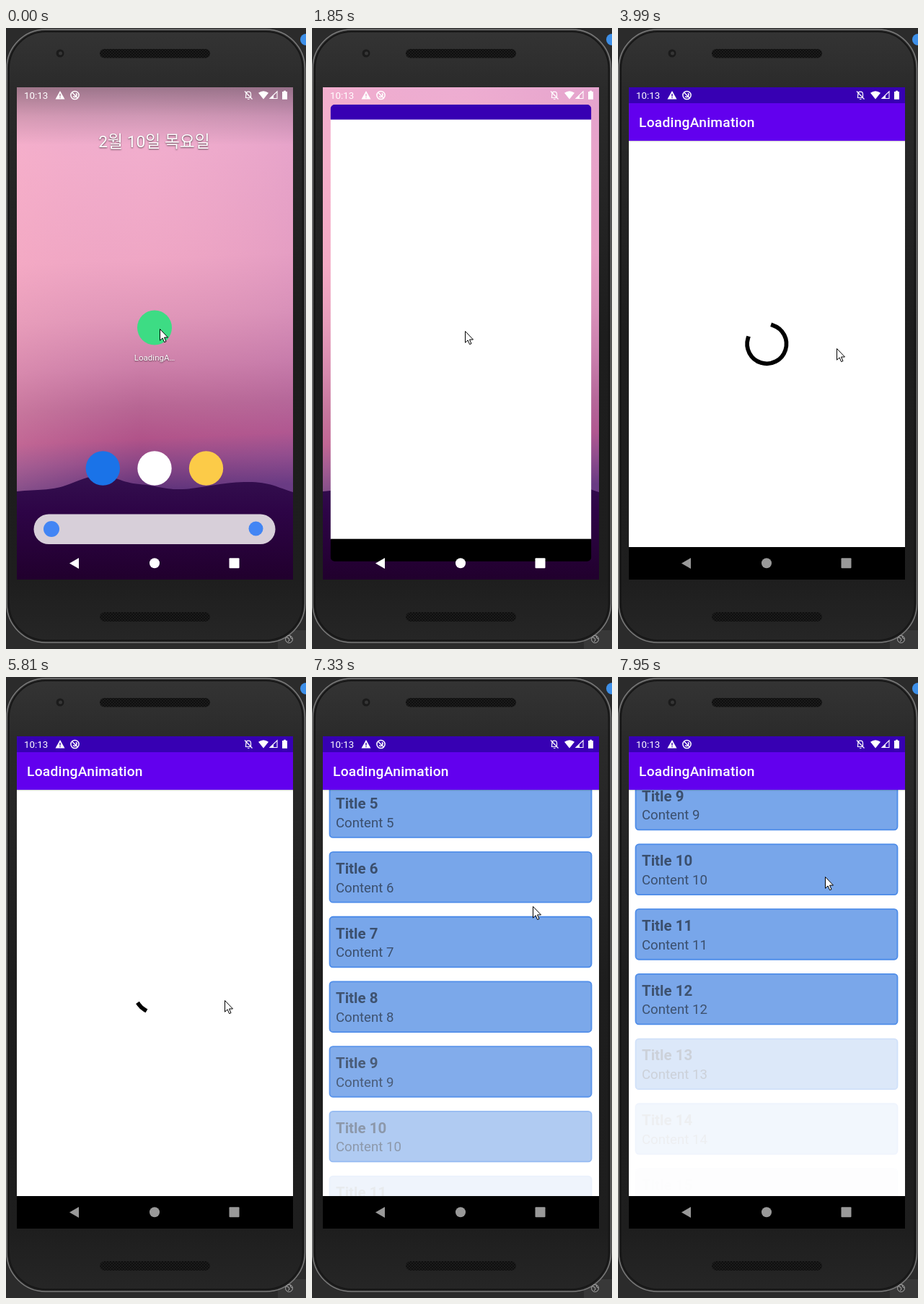
Write an HTML page that moves like this. It is 416 px wide and 859 px high and loops after 8000 ms.

```html
<!DOCTYPE html>
<html lang="ko">
<head>
<meta charset="utf-8">
<title>Loading animation</title>
<style>
  html, body { margin: 0; width: 100%; height: 100%; overflow: hidden; background: #2b2b2b; }
  svg { display: block; width: 100%; height: 100%; }
  text { font-family: Roboto, "Noto Sans CJK KR", "Noto Sans CJK", sans-serif; }
  .home text { fill: #fff; text-anchor: middle; text-shadow: 0 1px 2px #0009; }
  .bar-title { font-size: 19.2px; font-weight: 500; letter-spacing: .0125em; fill: #fff; }
  .card rect { fill: #78a6ea; stroke: #4d8ce9; stroke-width: 1.8; }
  .card text { fill: #3b4f6d; font-size: 18.64px; }
  .card .head { font-size: 20.5px; font-weight: 700; }
</style>
</head>
<body>
<svg viewBox="0 0 416 859">
  <defs>
    <linearGradient id="body" x2="0" y2="1">
      <stop stop-color="#343434"/><stop offset=".1" stop-color="#2a2a2a"/>
      <stop offset=".5" stop-color="#1d1d1d"/><stop offset=".9" stop-color="#1e1e1e"/>
      <stop offset="1" stop-color="#262626"/>
    </linearGradient>
    <linearGradient id="sky" x1="0" y1="0" x2=".025" y2="1">
      <stop stop-color="#eeaed3"/><stop offset=".15" stop-color="#f2aecd"/>
      <stop offset=".36" stop-color="#f0a7c5"/><stop offset=".48" stop-color="#e096b8"/>
      <stop offset=".58" stop-color="#cb7da7"/><stop offset=".66" stop-color="#b56391"/>
      <stop offset=".725" stop-color="#ae4f86"/><stop offset=".77" stop-color="#894383"/>
      <stop offset=".83" stop-color="#562c76"/>
    </linearGradient>
    <linearGradient id="dusk">
      <stop stop-color="#ffb0c0" stop-opacity=".25"/><stop offset=".45" stop-color="#e09ac0" stop-opacity=".05"/>
      <stop offset="1" stop-color="#b878bc" stop-opacity=".2"/>
    </linearGradient>
    <linearGradient id="hills" x2="0" y2="1">
      <stop stop-color="#34104f"/><stop offset=".35" stop-color="#2d0446"/><stop offset="1" stop-color="#21002d"/>
    </linearGradient>
    <linearGradient id="shade" x2="0" y2="1">
      <stop stop-color="#222" stop-opacity=".4"/><stop offset=".5" stop-color="#222" stop-opacity=".15"/>
      <stop offset="1" stop-color="#222" stop-opacity="0"/>
    </linearGradient>
    <linearGradient id="drop" x2="0" y2="1">
      <stop stop-color="#000" stop-opacity=".2"/><stop offset="1" stop-color="#000" stop-opacity="0"/>
    </linearGradient>
    <pattern id="mesh" width="4" height="4" patternUnits="userSpaceOnUse">
      <rect width="4" height="4" fill="#1b1b1b"/><circle cx="1" cy="1" r=".9" fill="#090909"/><circle cx="3" cy="3" r=".9" fill="#090909"/>
    </pattern>
    <clipPath id="screenClip"><rect x="15" y="82" width="383" height="681"/></clipPath>
    <clipPath id="listClip"><rect x="15" y="156" width="383" height="562"/></clipPath>
    <clipPath id="windowClip"><rect id="windowRect"/></clipPath>
  </defs>

  <!-- device -->
  <rect width="416" height="859" fill="#2b2b2b"/>
  <rect x="377" y="833" width="39" height="26" fill="#383838"/>
  <circle cx="416" cy="16" r="8" fill="#3d8fe8"/>
  <rect x="1" y="2" width="413.5" height="848" rx="54" fill="url(#body)" stroke="#7a7a7a" stroke-width="1.5"/>
  <rect x="4" y="5" width="407.5" height="842" rx="51" fill="none" stroke="#171717" stroke-width="2"/>
  <circle cx="75" cy="35" r="5.5" fill="#1b1b1b"/><circle cx="75.5" cy="35" r="2.5" fill="#363636"/>
  <rect x="130" y="29" width="153" height="12.5" rx="6.2" fill="url(#mesh)"/>
  <rect x="130" y="808" width="153" height="13" rx="6.5" fill="url(#mesh)"/>
  <g fill="none" stroke="#a9a9a9"><circle cx="392.5" cy="845.5" r="5"/><path d="M389 843l3 1 1 3-2 2M394 841l1 3 2 1"/></g>

  <g clip-path="url(#screenClip)">
    <rect x="15" y="82" width="383" height="681" fill="url(#sky)"/>
    <rect x="15" y="82" width="383" height="681" fill="url(#dusk)"/>
    <path d="M15 641C45 638 62 640 82 633S112 620 130 619S160 629 185 631S220 639 245 638S295 629 330 628S375 635 398 642V763H15Z" fill="url(#hills)"/>

    <g id="home" class="home">
      <rect x="15" y="82" width="383" height="80" fill="url(#shade)"/>
      <text x="205.5" y="165" font-size="22.8">2월 10일 목요일</text>
      <circle cx="206" cy="414.5" r="24" fill="#3ddc84"/>
      <text x="206" y="460" font-size="11.5">LoadingA…</text>
      <circle cx="134.3" cy="609" r="23.7" fill="#1a73e8"/>
      <circle cx="206" cy="609" r="23.7" fill="#fff"/>
      <circle cx="277.5" cy="609" r="23.7" fill="#fccb48"/>
      <rect x="38.5" y="672.5" width="335" height="41.5" rx="20.7" fill="#d7cfd9"/>
      <circle cx="63" cy="693" r="11" fill="#4285f4"/>
      <circle cx="346.5" cy="692.5" r="10" fill="#4285f4"/>
    </g>

    <g clip-path="url(#windowClip)">
      <g id="app">
        <rect x="15" y="103" width="383" height="616" fill="#fff"/>
        <rect x="15" y="82" width="383" height="22" fill="#3700b3"/>
        <rect x="15" y="718" width="383" height="45"/>
        <g id="content">
          <g id="list" clip-path="url(#listClip)"></g>
          <rect x="15" y="156" width="383" height="2" fill="url(#drop)"/>
          <rect x="15" y="104" width="383" height="52" fill="#6200ee"/>
          <text class="bar-title" x="29" y="137">LoadingAnimation</text>
          <path id="spinner" fill="none" stroke="#000" stroke-width="5.7" stroke-linecap="square"/>
        </g>
      </g>
    </g>

    <!-- system bars -->
    <g fill="#fff">
      <text x="25" y="98" font-size="13.3">10:13</text>
      <path fill-rule="evenodd" d="M75 87L81.5 98.5H68.5ZM74.3 91V94.7H75.7V91ZM74.3 95.7V97H75.7V95.7Z"/>
      <g fill="none" stroke="#fff">
        <circle cx="95.5" cy="93" r="5.6" stroke-width="1.5"/>
        <path d="M92 89.5L99 96.5M93 94.5A2.8 2.8 0 1 0 97 90.3" stroke-width="1.5"/>
        <path d="M332.5 96.5H339.5V91.5A3.3 3.3 0 0 0 332.8 91.5ZM331 87.5L341.5 98.5M335 98.5H337.5" stroke-width="1.2"/>
        <path d="M366 97.5H376V87.8Z" stroke-width="1.1"/>
      </g>
      <path d="M350 89.8Q357 84.5 364 89.8L357 98.5Z"/>
      <path d="M371 93V97.5H366.5Z"/>
      <path d="M383 88H385V86.7H388V88H390V98.7H383Z"/>
    </g>
    <g id="nav">
      <path d="M101 733V748L88 740.5Z"/><circle cx="206" cy="740.3" r="7"/><rect x="309.5" y="733.3" width="14" height="14" rx="1"/>
    </g>
    <circle id="touch" cx="212" cy="419" r="12" fill="#fff" opacity=".4"/>
  </g>
  <path id="cursor" d="M.5 .5V16.2L4.1 12.9L6.6 18.6L9 17.6L6.5 12H11.5Z" fill="#fff" stroke="#000" stroke-width="1"/>
</svg>

<script>
const LOOP = 8000, PITCH = 89.7, FIRST_TOP = 165.7, FADE = 500;
const LIST_AT = 5880, OPEN_AT = 1450, SPIN_AT = 1855;
const $ = id => document.getElementById(id);
const clamp = x => Math.max(0, Math.min(1, x));
const mix = (a, b, f) => a + (b - a) * f;
const ramp = (t, from, to) => clamp((t - from) / (to - from));
const easeOut = x => 1 - (1 - x) ** 3;
const show = (el, on) => el.setAttribute('display', on ? 'inline' : 'none');

// Piecewise linear lookup in [x, y] pairs.
function track(keys, x) {
  const i = keys.findIndex(k => k[0] > x);
  if (i < 0) return keys[keys.length - 1][1];
  if (i === 0) return keys[0][1];
  const [a, b] = [keys[i - 1], keys[i]];
  return mix(a[1], b[1], (x - a[0]) / (b[0] - a[0]));
}

const scrollKeys = [[6840, 0], [6915, 165], [7050, 255], [7218, 344.7], [7326, 373.3], [7500, 436],
  [7600, 455], [7690, 464], [7780, 524], [7855, 614], [7949, 742.7]];
const scrollTimes = scrollKeys.map(([t, y]) => [y, t]);
const cursorX = [[320, 213], [390, 212], [2330, 212], [2900, 303], [6840, 303], [6980, 309],
  [7326, 306], [7680, 298], [7949, 287]];
const cursorY = [[320, 416], [390, 419], [2330, 419], [2900, 443], [4000, 443], [5740, 447], [6490, 447],
  [6640, 456.5], [6840, 456.5], [6980, 300], [7326, 317], [7680, 425], [7949, 276]];

// Cubic easing from (0,0) to (1,1) with control points (x1,0) and (x2,1).
function ease(x1, x2, x) {
  let lo = 0, hi = 1;
  for (let i = 0; i < 20; i++) {
    const u = (lo + hi) / 2, v = 1 - u;
    if (3 * v * v * u * x1 + 3 * v * u * u * x2 + u * u * u < x) lo = u; else hi = u;
  }
  return lo * lo * (3 - 2 * lo);
}

function arc(start, sweep) {
  const point = deg => {
    const a = deg * Math.PI / 180;
    return `${206.3 + 27.2 * Math.sin(a)} ${437 - 27.2 * Math.cos(a)}`;
  };
  return `M${point(start)}A27.2 27.2 0 ${sweep > 180 ? 1 : 0} 1 ${point(start + sweep)}`;
}

const cards = Array.from({ length: 15 }, (_, i) => {
  const el = document.createElementNS('http://www.w3.org/2000/svg', 'g');
  el.setAttribute('class', 'card');
  el.innerHTML = `<rect x="24.5" y=".9" width="363" height="69.6" rx="4.5"/>
    <text class="head" x="33" y="30.8">Title ${i + 1}</text><text x="33" y="56.5">Content ${i + 1}</text>`;
  $('list').append(el);
  const top = FIRST_TOP + PITCH * i;
  return { el, top, born: top < 718 ? LIST_AT : track(scrollTimes, top - 718) };
});

// The window grows a little faster in width than in height.
function drawWindow(t) {
  const across = easeOut(ramp(t, OPEN_AT, OPEN_AT + 615));
  const down = easeOut(ramp(t, OPEN_AT, OPEN_AT + 645));
  const x = mix(182, 15, across), width = mix(48, 383, across);
  const y = mix(390, 82, down), height = mix(438, 763, down) - y;
  const rect = { x, y, width, height, rx: down < 1 ? mix(24, 4.5, down) : 0 };
  for (const key in rect) $('windowRect').setAttribute(key, rect[key]);
  const s = width / 383;
  $('app').setAttribute('transform', `translate(${x - 15 * s} ${y - 82 * s}) scale(${s})`);
  $('app').setAttribute('opacity', ramp(t, OPEN_AT, OPEN_AT + 150));
  $('home').setAttribute('opacity', 1 - ramp(t, OPEN_AT, OPEN_AT + 250));
  $('content').setAttribute('opacity', ramp(t, 2190, 2380));
  const tone = mix(255, 153, ramp(t, 2260, 2500));
  $('nav').setAttribute('fill', `rgb(${tone},${tone},${tone})`);
}

function drawSpinner(t) {
  show($('spinner'), t >= SPIN_AT && t < LIST_AT);
  const age = Math.max(0, t - SPIN_AT), p = age / 1400 % 1;
  const tail = 270 * ease(.4, .2, clamp(p * 2 - 1));
  const head = 270 * ease(.4, .2, clamp(p * 2));
  const turn = age * 720 / 4666 + 90 * p;
  $('spinner').setAttribute('d', arc(turn + tail, Math.max(.5, head - tail)));
}

function drawList(t) {
  const scroll = track(scrollKeys, t);
  for (const { el, top, born } of cards) {
    el.setAttribute('transform', `translate(0 ${top - scroll})`);
    el.setAttribute('opacity', .5 - .5 * Math.cos(Math.PI * ramp(t, born, born + FADE)));
  }
}

function tick(t) {
  const [base, step] = t < 6840 ? [0, 70] : [6840, 69.3];
  return base + step * Math.floor((t - base) / step);
}

function frame(now) {
  const time = now % LOOP, t = tick(time);
  drawWindow(t);
  drawSpinner(t);
  drawList(t);
  show($('touch'), time >= 1310 && time < OPEN_AT);
  $('cursor').setAttribute('transform', `translate(${track(cursorX, t)} ${track(cursorY, t)})`);
  requestAnimationFrame(frame);
}
frame(0);
</script>
</body>
</html>
```
